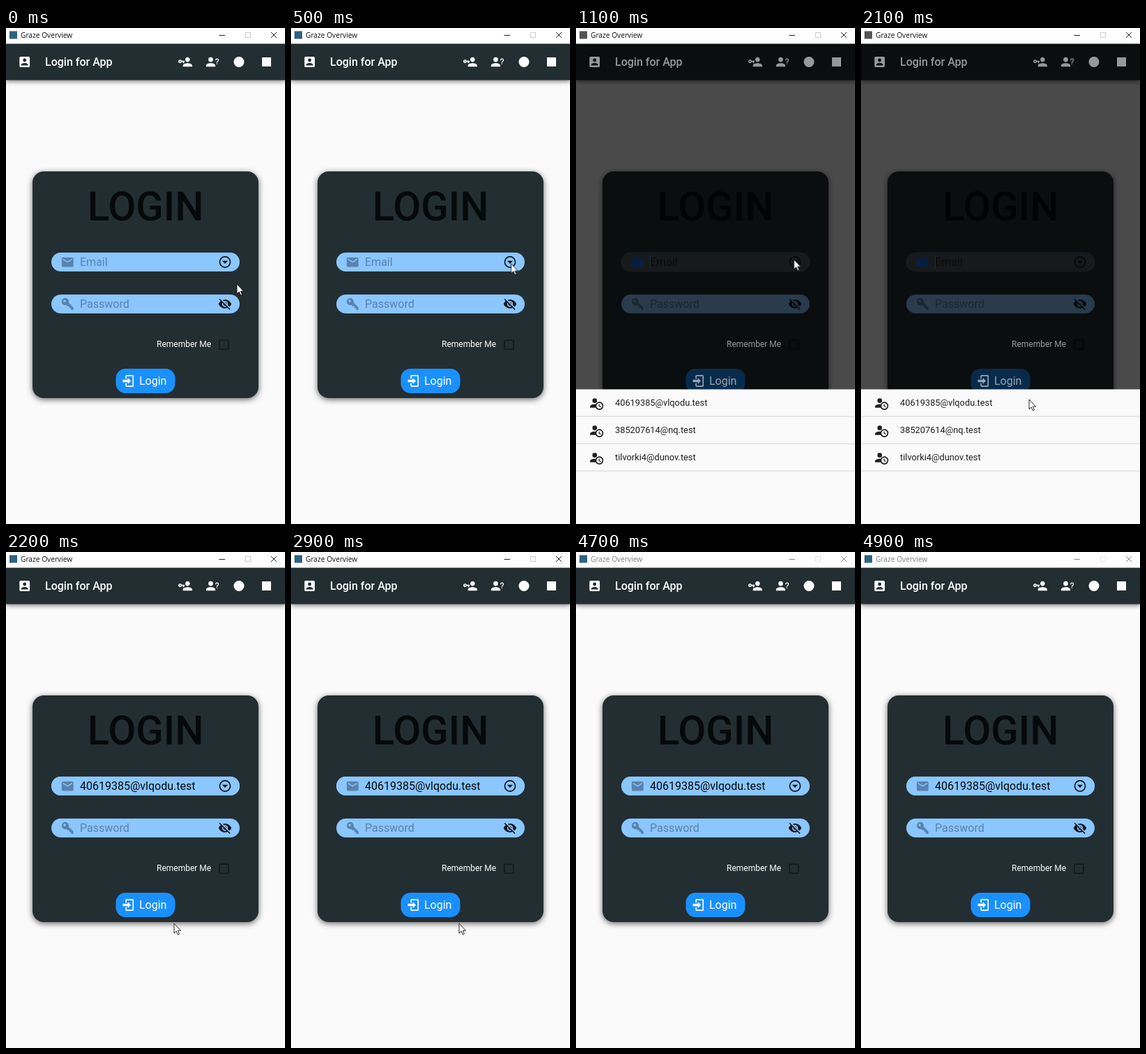
Animation of 400 by 709 pixels, one loop 5 s. Source, as an HTML page:

```html
<!DOCTYPE html>
<html lang="en">
<head>
<meta charset="utf-8">
<title>Login</title>
<style>
  html, body { margin: 0; width: 100%; height: 100%; overflow: hidden; background: #fafafa; }
  svg { display: block; width: 100%; height: 100%; font-family: Roboto, sans-serif; }
  text { white-space: pre; }
  .icon { fill-rule: evenodd; }
  .field { font-size: 16px; }
  .list { font-size: 12.8px; }
  .shadow { filter: drop-shadow(0 2px 3px rgba(0, 0, 0, .5)); }
  .card { filter: drop-shadow(0 2px 4px rgba(0, 0, 0, .6)); }

  /* One loop is 5 s, so 2% is one tick of 100 ms. */
  .focus, .caret, .filled, .open, .bright, .app-icon, .caption, .cursor {
    animation: 5s step-end infinite;
  }
  .focus { animation-name: focus; }
  .caret { animation-name: caret; }
  .filled { animation-name: filled; }
  .open { animation-name: open; }
  .bright { animation-name: dim; }
  .app-icon { animation-name: grey; }
  .caption { animation-name: inactive; }
  .cursor { animation-name: move; }

  @keyframes focus {
    0% { opacity: 0; }
    14% { opacity: 0; animation-timing-function: steps(3, start); }
    20% { opacity: 1; }
    44%, 100% { opacity: 0; }
  }
  @keyframes caret {
    0% { opacity: 0; }
    16% { opacity: 1; }
    44%, 100% { opacity: 0; }
  }
  @keyframes filled { 0% { opacity: 0; } 44%, 100% { opacity: 1; } }
  @keyframes open {
    0% { opacity: 0; }
    22% { opacity: 1; }
    44%, 100% { opacity: 0; }
  }
  @keyframes dim {
    0% { opacity: 1; }
    22% { opacity: .58; }
    44%, 100% { opacity: 1; }
  }
  @keyframes grey {
    0% { fill: #2f627f; }
    22% { fill: #555; }
    44%, 100% { fill: #2f627f; }
  }
  @keyframes inactive { 0% { opacity: 1; } 94%, 100% { opacity: .55; } }
  @keyframes move {
    0% { transform: translate(331px, 366px); }
    2% { transform: translate(331px, 366px); animation-timing-function: steps(6, start); }
    14% { transform: translate(312.5px, 331px); }
    26% { transform: translate(312.5px, 331px); animation-timing-function: steps(6, start); }
    38% { transform: translate(241px, 531px); }
    66% { transform: translate(241px, 531px); animation-timing-function: steps(3, start); }
    72% { transform: translate(241px, 550px); visibility: hidden; }
    100% { transform: translate(241px, 550px); visibility: hidden; }
  }
</style>
</head>
<body>
<svg viewBox="0 0 400 709" preserveAspectRatio="none">
  <defs>
    <!-- Icons share a 24-unit box centred on the origin. -->
    <g id="box" class="icon" transform="scale(.82) translate(-12 -12)"><path d="M6,17C6,15 10,13.9 12,13.9C14,13.9 18,15 18,17V18H6M15,9A3,3 0 0,1 9,9A3,3 0 0,1 15,9M3,5V19A2,2 0 0,0 5,21H19A2,2 0 0,0 21,19V5A2,2 0 0,0 19,3H5C3.89,3 3,3.9 3,5Z"/></g>
    <g id="user-key" class="icon" transform="scale(.83) translate(-12 -12)"><path d="M11 10V12H10V14H8V12H5.83C5.42 13.17 4.31 14 3 14C1.34 14 0 12.66 0 11S1.34 8 3 8C4.31 8 5.42 8.83 5.83 10H11M3 10C2.45 10 2 10.45 2 11S2.45 12 3 12 4 11.55 4 11 3.55 10 3 10M16 14C18.67 14 24 15.34 24 18V20H8V18C8 15.34 13.33 14 16 14M16 12C13.79 12 12 10.21 12 8S13.79 4 16 4 20 5.79 20 8 18.21 12 16 12Z"/></g>
    <g id="user-ask" class="icon" transform="scale(.83) translate(-12 -12)"><path d="M13,8A4,4 0 0,1 5,8A4,4 0 0,1 13,8M17,18V20H1V18C1,15.79 4.58,14 9,14C13.42,14 17,15.79 17,18M20.5,14.5V16H19V14.5H20.5M18.5,9.5H17V9A3,3 0 0,1 23,9C23,9.97 22.5,10.88 21.71,11.41L21.41,11.6C20.84,12 20.5,12.61 20.5,13.3V13.5H19V13.3C19,12.11 19.6,11 20.59,10.35L20.88,10.16C21.27,9.9 21.5,9.47 21.5,9A1.5,1.5 0 0,0 18.5,9V9.5Z"/></g>
    <g id="mail" class="icon" transform="scale(.84) translate(-12 -12)"><path d="M20,8L12,13L4,8V6L12,11L20,6M20,4H4C2.89,4 2,4.89 2,6V18A2,2 0 0,0 4,20H20A2,2 0 0,0 22,18V6C22,4.89 21.1,4 20,4Z"/></g>
    <g id="key" class="icon" transform="scale(.84) translate(-12 -12)"><path d="M22,18V22H18V19H15V16H12L9.74,13.74C9.19,13.91 8.61,14 8,14A6,6 0 1,1 14,8C14,8.61 13.91,9.19 13.74,9.74L22,18M7,5A2,2 0 0,0 7,9A2,2 0 0,0 7,5Z"/></g>
    <g id="drop" class="icon" transform="scale(.84) translate(-12 -12)"><path d="M12,4A8,8 0 0,0 12,20A8,8 0 0,0 12,4M12,2A10,10 0 0,1 12,22A10,10 0 0,1 12,2M7,10L12,15L17,10H7Z"/></g>
    <g id="eye-off" class="icon" transform="scale(.84) translate(-12 -12)"><path d="M11.83,9L15,12.16V12A3,3 0 0,0 12,9H11.83M7.53,9.8L9.08,11.35C9.03,11.56 9,11.77 9,12A3,3 0 0,0 12,15C12.22,15 12.44,14.97 12.65,14.92L14.2,16.47C13.53,16.8 12.79,17 12,17A5,5 0 0,1 7,12C7,11.21 7.2,10.47 7.53,9.8M2,4.27L4.73,7C3.08,8.3 1.78,10 1,12C2.73,16.39 7,19.5 12,19.5C13.55,19.5 15.03,19.2 16.38,18.66L19.73,22L21,20.73L3.27,3M12,7A5,5 0 0,1 17,12C17,12.64 16.87,13.26 16.64,13.82L19.57,16.75C21.07,15.5 22.27,13.86 23,12C21.27,7.61 17,4.5 12,4.5C10.6,4.5 9.26,4.75 8,5.2L10.17,7.35C10.74,7.13 11.35,7 12,7Z"/></g>
    <g id="enter" class="icon" transform="scale(.84) translate(-11 -12)"><path d="M10,17.25V14H1.5V10H10V6.75L15.25,12L10,17.25M8,2H18A2,2 0 0,1 20,4V20A2,2 0 0,1 18,22H8A2,2 0 0,1 6,20V16H8V20H18V4H8V8H6V4A2,2 0 0,1 8,2Z"/></g>
    <g id="user-clock" class="icon" transform="scale(.83) translate(-12 -12)"><path d="M10.63,14.1A7,7 0 1,1 10.67,20H1V18C1.06,16.86 1.84,15.93 3.34,15.18C4.84,14.43 6.72,14.04 9,14C9.57,14 10.11,14.05 10.63,14.1M9,4A4,4 0 0,1 9,12A4,4 0 0,1 9,4M17,22A5,5 0 0,0 17,12A5,5 0 0,0 17,22M16,14H17.5V16.82L19.94,18.23L19.19,19.53L16,17.69V14Z"/></g>
    <rect id="pill" width="270" height="27" rx="13.5"/>
  </defs>

  <rect width="400" height="709" fill="#fafafa"/>
  <rect class="shadow" y="22" width="400" height="52.5" fill="#232e32"/>

  <rect class="card" x="38" y="205" width="324" height="324" rx="16" fill="#232e32"/>
  <text x="200" y="274.5" text-anchor="middle" font-size="58" font-weight="500" fill="#06090a">LOGIN</text>

  <g class="field">
    <use href="#pill" x="65" y="321" fill="#8bc6ff"/>
    <use href="#mail" x="88.3" y="334.7" fill="#5783ad"/>
    <text x="106" y="340" fill="#5783ad">Email</text>

    <g class="focus">
      <use href="#pill" x="65" y="321" fill="#505557" stroke="#2d6690"/>
      <use href="#mail" x="88.3" y="334.7" fill="#1568e3"/>
      <text x="106" y="340" fill="#25292b">Email</text>
    </g>
    <path class="caret" d="M106.5,325V344" stroke="#5b9dd0"/>

    <g class="filled">
      <use href="#pill" x="65" y="321" fill="#8bc6ff"/>
      <use href="#mail" x="88.3" y="334.7" fill="#5783ad"/>
      <text x="106" y="340" fill="#05080a">40619385@vlqodu.test</text>
    </g>
    <use href="#drop" x="314" y="334.5" fill="#10181d"/>

    <use href="#pill" x="65" y="381" fill="#8bc6ff"/>
    <use href="#key" x="88.3" y="394.5" fill="#5783ad"/>
    <text x="106" y="400" fill="#5783ad">Password</text>
    <use href="#eye-off" x="314" y="394.5" fill="#10181d"/>
  </g>

  <rect x="306" y="446.2" width="13" height="13" rx="1.5" fill="none" stroke="#10181a" stroke-width="1.5"/>
  <rect x="157.5" y="487" width="85" height="35" rx="14" fill="#1a90ff"/>

  <rect class="open" y="22" width="400" height="687" fill="#000" fill-opacity=".7"/>

  <g class="bright" fill="#fff">
    <use href="#box" x="26.7" y="48.5"/>
    <text x="56" y="54" font-size="16" font-weight="500">Login for App</text>
    <use href="#user-key" x="257" y="48.5"/>
    <use href="#user-ask" x="296" y="48.5"/>
    <circle cx="334" cy="48.5" r="7.5"/>
    <rect x="367" y="42" width="13" height="13"/>
    <text x="216" y="456" font-size="12">Remember Me</text>
    <use href="#enter" x="175.5" y="504.5"/>
    <text class="field" x="191" y="510">Login</text>
  </g>

  <g class="open">
    <rect y="516.5" width="400" height="192.5" fill="#fafafa"/>
    <path d="M0,555.3H400M0,594.3H400M0,633.3H400" stroke="#e2e2e2" stroke-width="1.5"/>
    <g class="list" fill="#202020">
      <use href="#user-clock" x="29.3" y="536"/>
      <text x="56" y="540">40619385@vlqodu.test</text>
      <use href="#user-clock" x="29.3" y="575"/>
      <text x="56" y="579">385207614@nq.test</text>
      <use href="#user-clock" x="29.3" y="614"/>
      <text x="56" y="618">tilvorki4@dunov.test</text>
    </g>
  </g>

  <rect width="400" height="22.5" fill="#fff"/>
  <rect class="app-icon" x="5" y="4.5" width="11" height="11" fill="#2f627f"/>
  <g class="caption">
    <text x="21" y="14" font-size="10.2" font-family="'Open Sans', 'Noto Sans', sans-serif" fill="#111">Graze Overview</text>
    <path d="M305.5,10.5H314M380,6L388,14M388,6L380,14" stroke="#222" fill="none"/>
    <rect x="343.5" y="6.5" width="7" height="7" fill="none" stroke="#ccc"/>
  </g>

  <path class="cursor" d="M0,0V14L3.2,11L5.4,16L7.5,15L5.4,10.2H9.6Z" fill="#fff" stroke="#111" stroke-width=".9"/>
</svg>
</body>
</html>
```
